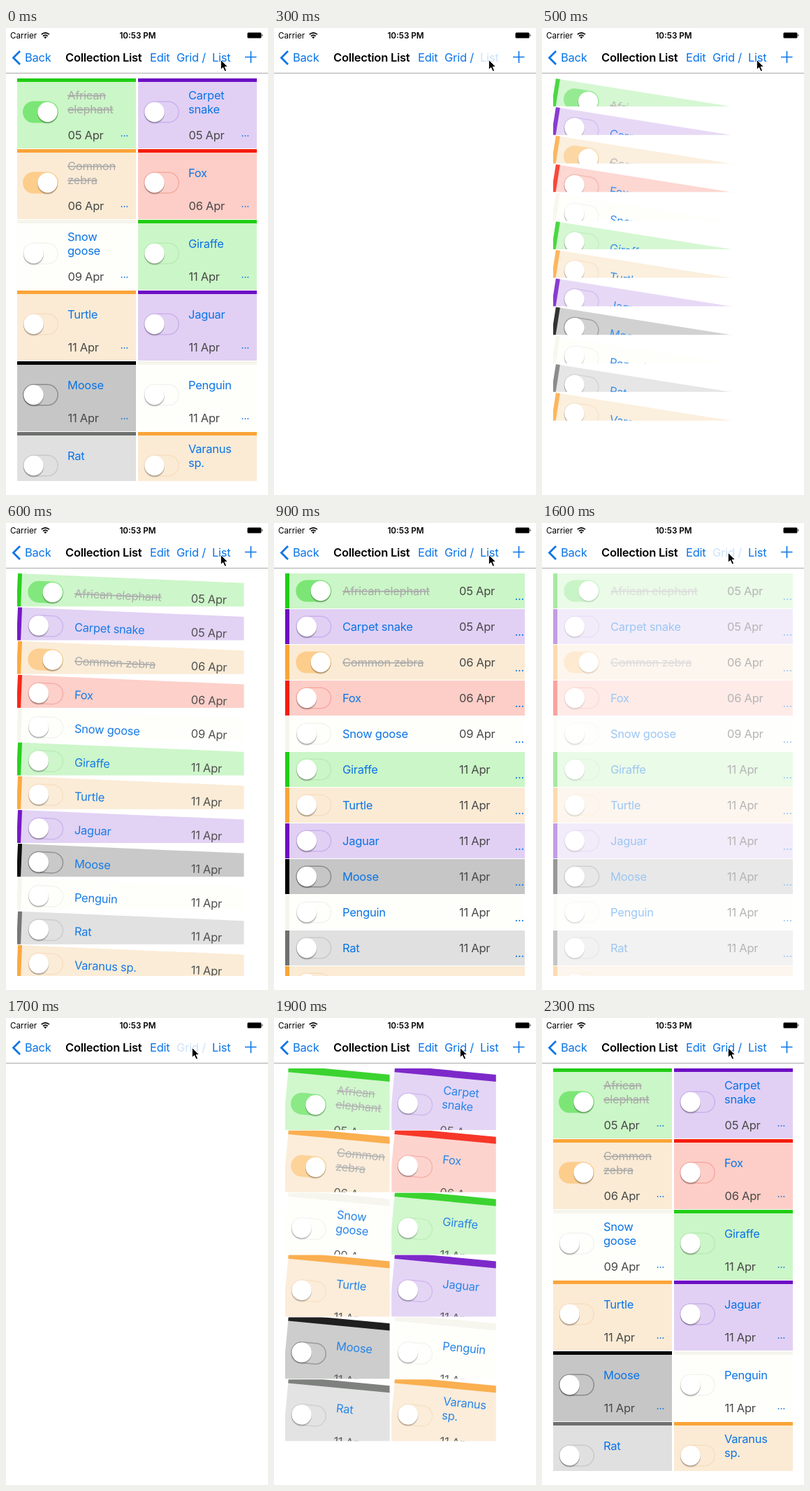
These frames come from a looping animation (375x667 px, 2.4 s). An HTML page:

```html
<!DOCTYPE html>
<html lang="en">
<head>
<meta charset="utf-8">
<title>Collection List</title>
<style>
  html, body { margin: 0; width: 100%; height: 100%; overflow: hidden; background: #fff; }
  svg { display: block; }
  text { font-family: Inter, "Liberation Sans", sans-serif; font-size: 16.5px; letter-spacing: -.25px; white-space: pre; }
  .link { fill: #0a74e6; }
  .done { fill: #a9a9a9; text-decoration: line-through; }
  .date { fill: #474747; }
  .title { font-weight: 600; }
  .small { font-size: 11.7px; letter-spacing: 0; }
</style>
</head>
<body>
<svg id="stage" width="375" height="667" viewBox="0 0 375 667">
  <rect width="375" height="667" fill="#fff"/>
  <svg id="view" width="375" height="647"></svg>

  <text class="small" x="6" y="14.5">Carrier</text>
  <g fill="none" stroke="#000" stroke-width="1.7">
    <path d="M50.7 9.2Q56.3 4.4 61.9 9.2"/>
    <path d="M52.9 11.6Q56.3 8.6 59.7 11.6"/>
  </g>
  <path d="M54.2 13Q56.3 11.3 58.4 13L56.3 15.2Z"/>
  <text class="small title" x="188.5" y="14.5" text-anchor="middle">10:53 PM</text>
  <rect x="345.5" y="6.5" width="20" height="8" rx="1.5"/>
  <path d="M366.5 8.8q2 1.7 0 3.4z"/>

  <path d="M20 33L10.5 42.5L20 52" fill="none" stroke="#0a74e6" stroke-width="2.8"/>
  <text class="link" x="27" y="48">Back</text>
  <text class="title" x="85" y="48">Collection List</text>
  <text class="link" x="206" y="48">Edit</text>
  <text class="link" id="gridBtn" x="244" y="48">Grid /</text>
  <text class="link" id="listBtn" x="295" y="48">List</text>
  <path d="M342 41.5H358.5M350.5 33V50" stroke="#0a74e6" stroke-width="1.6"/>
  <path d="M0 64.5H375" stroke="#a9a9a9"/>
  <path id="cursor" d="M0 0V14.2L3.3 11.2L5.8 16.8L8.3 15.7L5.9 10.2H10.4Z" stroke="#fff" stroke-width="1"/>
</svg>
<script>
const LOOP = 2400, STEP = 100, LEFT = 16, TOP = 72;

// bar, background, switch outline, switch fill when on
const TONES = {
  green:  ["#20cd14", "#cbf6c7", "#b9ecb5", "#7be676"],
  purple: ["#6c0cc3", "#e1d0f4", "#cbb1eb"],
  orange: ["#faa438", "#fbebd5", "#f8dec0", "#fdcd8c"],
  red:    ["#f51c0c", "#fdcec7", "#f4aaa3"],
  white:  ["#f5f5ec", "#fefefb", "#f3f3f0"],
  black:  ["#000000", "#c6c6c6", "#8c8c8c"],
  gray:   ["#6e706e", "#e0e0e0", "#cacaca"]
};

const ITEMS = [
  ["African elephant", "05", "green", true],
  ["Carpet snake", "05", "purple"],
  ["Common zebra", "06", "orange", true],
  ["Fox", "06", "red"],
  ["Snow goose", "09", "white"],
  ["Giraffe", "11", "green"],
  ["Turtle", "11", "orange"],
  ["Jaguar", "11", "purple"],
  ["Moose", "11", "black"],
  ["Penguin", "11", "white"],
  ["Rat", "11", "gray"],
  ["Varanus sp.", "11", "orange"]
];

const LAYOUTS = {
  grid: {
    cols: 2, w: 170, h: 100, dx: 173, dy: 101,
    bar: [0, -5, 170, 10], sw: [8, 48], name: 72, date: [72.5, 87], dots: [147.5, 82.5], dotSize: 14.5
  },
  list: {
    cols: 1, w: 343, h: 50, dx: 0, dy: 51,
    bar: [0, 0, 6, 50], sw: [15.3, 25], name: 82, date: [249, 31], dots: [328.5, 37.5], dotSize: 16.5
  }
};

const byId = id => document.getElementById(id);

function add(parent, tag, attrs, content) {
  const el = document.createElementNS("http://www.w3.org/2000/svg", tag);
  set(el, attrs);
  if (content) el.textContent = content;
  parent.appendChild(el);
  return el;
}

function set(el, attrs) {
  for (const key in attrs) el.setAttribute(key, attrs[key]);
}

function addRect(parent, x, y, width, height, attrs) {
  return add(parent, "rect", { x, y, width, height, ...attrs });
}

function addSwitch(parent, x, y, tone, on) {
  addRect(parent, x + .75, y - 14.75, 49.5, 29.5, {
    rx: 14.75, fill: on ? tone[3] : "none", stroke: on ? tone[3] : tone[2], "stroke-width": 1.5
  });
  const cx = x + (on ? 35.5 : 15.5);
  add(parent, "circle", { cx, cy: y + 2.6, r: 14.3, fill: "#000", opacity: .1 });
  add(parent, "circle", { cx, cy: y + 1.2, r: 14.6, fill: "#000", opacity: .2 });
  add(parent, "circle", { cx, cy: y, r: 14.2, fill: "#fff" });
}

function addCell(parent, layout, [name, day, toneName, on]) {
  const tone = TONES[toneName];
  const clip = add(parent, "svg", { overflow: "hidden" });
  const body = add(clip, "g", {});
  addRect(body, 0, 0, layout.w, layout.h, { fill: tone[1] });
  addRect(body, ...layout.bar, { fill: tone[0] });
  addSwitch(body, ...layout.sw, tone, on);

  const lines = layout.cols > 1 ? name.split(" ") : [name];
  const first = layout.cols > 1 ? 50 - lines.length * 10 : 31;
  lines.forEach((line, i) =>
    add(body, "text", { x: layout.name, y: first + i * 20, class: on ? "done" : "link" }, line));

  const [x, y] = layout.date;
  add(body, "text", { x, y, class: "date" }, day + " Apr");
  const [dotX, dotY] = layout.dots;
  add(body, "text", { x: dotX, y: dotY, class: "link", style: `font-size:${layout.dotSize}px` }, "...");
  return { clip, body };
}

for (const layout of Object.values(LAYOUTS)) {
  layout.group = add(byId("view"), "g", {});
  layout.cells = ITEMS.map(item => addCell(layout.group, layout, item));
}

// Cells grow from nothing while their content swings level about its left middle.
function place(layout, p, alpha) {
  set(layout.group, { opacity: alpha, display: p > 0 && alpha > 0 ? "inline" : "none" });
  layout.cells.forEach(({ clip, body }, i) => {
    const col = i % layout.cols, row = Math.floor(i / layout.cols);
    set(clip, {
      x: LEFT + col * layout.dx * p,
      y: TOP + row * layout.dy * p,
      width: layout.w * p,
      height: layout.h * p
    });
    set(body, { transform: `rotate(${45 * (1 - p)} 0 ${layout.h / 2})`, opacity: p });
  });
}

const clamp = v => Math.min(1, Math.max(0, v));
const easeOut = u => 1 - (1 - clamp(u)) ** 3;
const smooth = u => u * u * (3 - 2 * u);

function draw(time) {
  const t = Math.floor(time / STEP) * STEP;
  const listIn = easeOut((t - 300) / 482);
  const gridIn = t < 1700 ? 1 : easeOut((t - 1700) / 395);
  const listOut = t < 1600 ? 1 : t < 1700 ? .4 : 0;

  place(LAYOUTS.grid, gridIn, t < 300 || t > 1700 ? 1 : 0);
  place(LAYOUTS.list, listIn, listOut);

  set(byId("listBtn"), { opacity: t >= 200 && t <= 300 ? .2 : 1 });
  set(byId("gridBtn"), { opacity: t >= 1500 && t <= 1700 ? .2 : 1 });

  const k = smooth(clamp((t - 1000) / 300));
  set(byId("cursor"), { transform: `translate(${307.3 - 41 * k} ${45.3 - 3 * k})` });
}

const start = performance.now();
function tick() {
  draw((performance.now() - start) % LOOP);
  requestAnimationFrame(tick);
}
draw(0);
requestAnimationFrame(tick);
</script>
</body>
</html>
```
